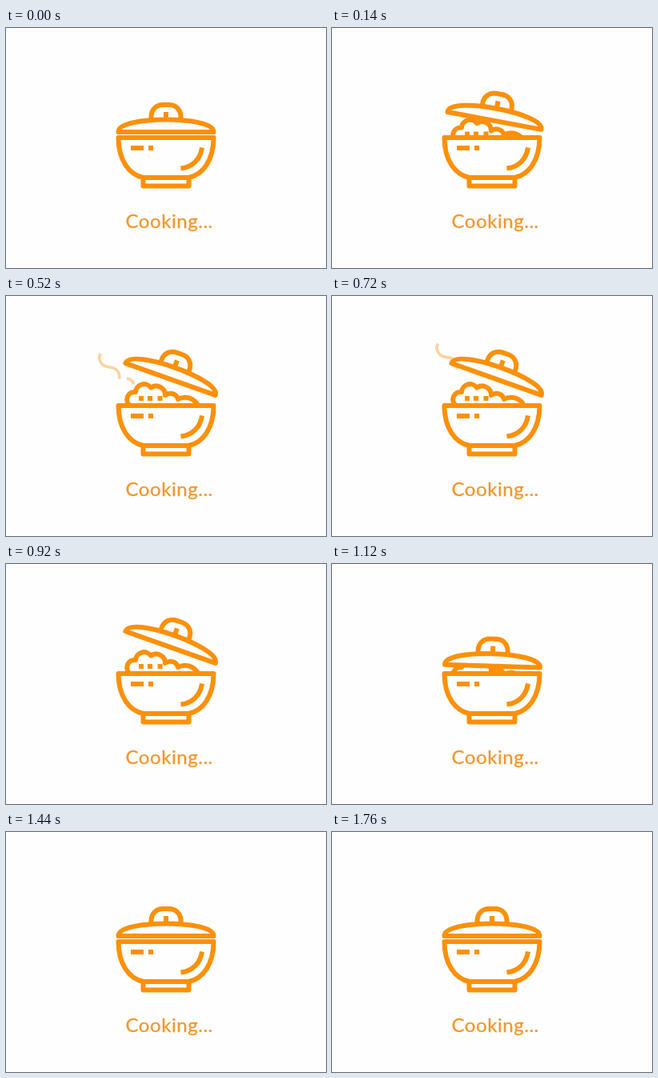
An HTML page that plays this animation: 400x300 px, repeating every 1780 ms.

```html
<!DOCTYPE html>
<html lang="en">
<head>
<meta charset="utf-8">
<title>Cooking</title>
<style>
  html, body { margin: 0; width: 100%; height: 100%; overflow: hidden; background: #fefefe; }
  svg { display: block; width: 400px; height: 300px; }
  .line { fill: #fefefe; stroke: #fc9008; stroke-width: 6; stroke-linejoin: round; }
  .solid { fill: #fc9008; stroke: none; }
  .shine { fill: none; }
  .steam { fill: none; stroke: #fbd3a0; stroke-width: 3.6; }
  text { font: 24px Lato, sans-serif; letter-spacing: .55px; fill: #f5962a; stroke: #f5962a; stroke-width: .3; }
</style>
</head>
<body>
<svg viewBox="0 0 400 300">
  <defs>
    <path id="wisp" pathLength="1" d="M142 104C142 98 141 92 134 90C128 88 123 90 119 84C116 80 116 76 118 72"/>
  </defs>
  <use class="steam" href="#wisp"/>
  <use class="steam" href="#wisp"/>
  <g id="food" class="line">
    <path d="M155 137A9.5 9.5 0 0 1 162 120A10.5 10.5 0 0 1 181 114.5A11.5 11.5 0 0 1 199 124A10 10 0 0 1 215 129A18 18 0 0 1 240 137"/>
    <path class="solid" d="M166 125h6v6h-6zM177 125h6v6h-6zM189.5 125h6v6h-6z"/>
  </g>
  <g class="line">
    <path d="M140.5 137H259.5C259.5 165 246 184 228 187H172C154 184 140.5 165 140.5 137Z"/>
    <rect x="171.5" y="187" width="57" height="10.5"/>
    <path class="solid" d="M156 147h16v6h-16zM178 147h6v6h-6z"/>
    <path class="shine" d="M218.5 175.5C233 174 243 164 245 149.5"/>
  </g>
  <g id="lid" class="line">
    <path d="M-18.5 -15V-19C-18.5 -28 -12 -34 -4 -34H4C12 -34 18.500 -28 18.500 -19V-15Z"/>
    <path class="solid" d="M-3 -25h6v9h-6z"/>
    <path d="M-59.500 0C-60 -11 -28 -15.500 0 -15.500S60 -11 59.500 0Z"/>
  </g>
  <text x="149.500" y="250">Cooking...</text>
</svg>
<script>
const LOOP = 1780;
const lid = document.getElementById("lid");
const food = document.getElementById("food");
const wisps = document.querySelectorAll(".steam");

const ramp = (t, from, to) => Math.min(1, Math.max(0, (t - from) / (to - from)));
const ease = (t, from, to) => (1 - Math.cos(Math.PI * ramp(t, from, to))) / 2;

// Each wisp grows along its curve while rising, then its tail catches up.
function drawWisp(el, t, x, y) {
  const head = 0.15 + 0.85 * ramp(t, 160, 400);
  const tail = 0.15 - 0.15 * ramp(t, 280, 400) + ramp(t, 530, 620);
  const rise = (520 - t) / 240;
  const length = Math.max(0, head - tail);
  el.setAttribute("transform", `translate(${x + 5 * rise} ${y + 31 * rise})`);
  el.setAttribute("stroke-dasharray", `0 ${tail} ${length} 9`);
  el.style.display = length > 0 ? "" : "none";
}

function draw(t) {
  const open = ease(t, 20, 250) * (1 - ease(t, 960, 1160));
  lid.setAttribute("transform",
    `translate(${200 + 5.5 * open} ${130 - 26 * open}) rotate(${19.5 * open})`);
  food.setAttribute("transform", `translate(0 ${10 * (1 - open)})`);
  food.style.display = open > 0.02 ? "" : "none";
  drawWisp(wisps[0], t, 0, 0);
  drawWisp(wisps[1], t - 290, 12.5, -24);
}

function frame() {
  draw(performance.now() % LOOP);
  requestAnimationFrame(frame);
}
frame();
</script>
</body>
</html>
```
